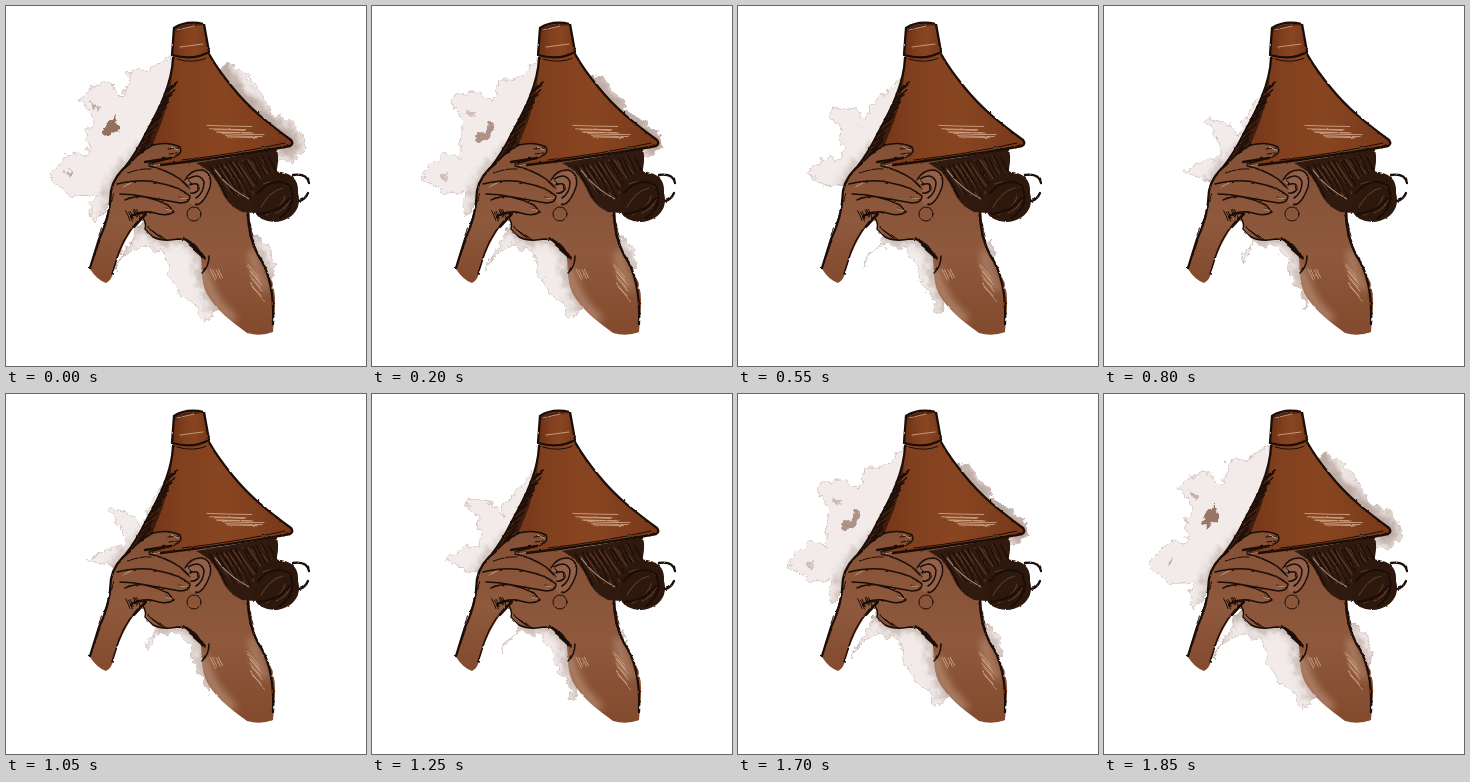
Recreate the animation shown at these times as an HTML page. Size 360 by 360 pixels, loop 1900 ms.

```html
<!DOCTYPE html>
<html lang="en">
<head>
<meta charset="utf-8">
<title>Woman with a clay hat</title>
<style>
  html, body { margin: 0; width: 100%; height: 100%; overflow: hidden; background: #fff; }
  svg { display: block; width: 100vw; height: 100vh; }
  .ink { fill: none; stroke: #1b0d07; stroke-width: 1.5; stroke-linecap: round; stroke-linejoin: round; }
  .bold { stroke-width: 2.3; }
  .fine { stroke-width: 1; }
  .chalk { fill: none; stroke: #cfa283; stroke-width: .9; stroke-linecap: round; }
  .lock { fill: none; stroke: #5b3823; stroke-width: 1.2; stroke-linecap: round; }
</style>
</head>
<body>
<svg viewBox="0 0 360 360">
  <defs>
    <linearGradient id="clay" x1="0" y1="0" x2="1" y2="0">
      <stop offset="0" stop-color="#6a3013"/>
      <stop offset=".35" stop-color="#81401e"/>
      <stop offset=".6" stop-color="#884521"/>
      <stop offset="1" stop-color="#78391a"/>
    </linearGradient>
    <linearGradient id="skin" x1="0" y1="0" x2="0" y2="1">
      <stop offset="0" stop-color="#845035"/>
      <stop offset=".55" stop-color="#8e593d"/>
      <stop offset="1" stop-color="#834a2d"/>
    </linearGradient>
    <filter id="ragged" x="-10%" y="-10%" width="120%" height="120%" color-interpolation-filters="sRGB">
      <feTurbulence type="fractalNoise" baseFrequency=".11" numOctaves="3" seed="8"/>
      <feDisplacementMap in="SourceGraphic" scale="13" xChannelSelector="R" yChannelSelector="G"/>
    </filter>
    <filter id="sketchy" x="-10%" y="-10%" width="120%" height="120%" color-interpolation-filters="sRGB">
      <feTurbulence type="fractalNoise" baseFrequency=".2" numOctaves="2" seed="3"/>
      <feDisplacementMap in="SourceGraphic" scale="2" xChannelSelector="R" yChannelSelector="G"/>
    </filter>
    <filter id="soft" x="-60%" y="-60%" width="220%" height="220%">
      <feGaussianBlur stdDeviation="4"/>
    </filter>
    <clipPath id="inStain"><path class="stain"/></clipPath>
    <clipPath id="inFace"><use href="#face"/></clipPath>

    <path id="cone" d="M167 49C166 82 148 112 138 131Q130 147 117 162L150 159Q230 150 284 140Q288 138 285 134C262 117 244 103 227 82Q212 64 203 47Z"/>
    <path id="knob" d="M168 22Q181 13 198 18L203 46Q187 55 166 49Z"/>
    <path id="face" d="M142 160L240 150 244 215C245 235 254 252 263 269Q270 282 269 300L267 326Q254 331 241 327C226 316 210 304 201 288C194 274 197 260 194 246Q186 233 172 233Q156 236 147 231Q144 226 140 223Q141 217 136 211Z"/>
    <path id="arm" d="M174 141Q162 135 147 139Q134 146 124 157Q109 169 105 184Q104 211 94 231Q86 249 84 263Q91 274 100 277Q106 274 107 266Q112 248 121 232Q129 218 139 208Q153 212 168 208Q170 203 163 199Q175 199 184 194Q187 184 177 176L145 158Q161 155 172 150Q177 146 174 141Z"/>
    <path id="hair" d="M190 157L271 143Q274 156 269 170Q267 190 249 207L236 206Q221 199 215 184Q208 168 197 161Z"/>
    <path id="bun" d="M256 172Q266 163 279 167Q293 171 292 187Q296 202 284 211Q270 220 256 213Q245 208 249 192Q248 180 256 172Z"/>
  </defs>

  <g filter="url(#ragged)">
    <path class="stain" fill="#f2ebea" stroke="#cbb9b2" stroke-width=".8"/>
    <g clip-path="url(#inStain)">
      <g filter="url(#soft)" fill="none" stroke="#6b4634" stroke-width="8" opacity=".4">
        <use href="#face"/><use href="#arm"/>
        <path d="M205 50Q230 95 285 134L280 150" stroke-width="18"/>
      </g>
      <g id="specks" fill="#94705f">
        <path d="M97 123L104 116 110 108 112 120 106 130 97 131Z"/>
        <path d="M84 98L94 101 89 105ZM59 165L65 162 63 172Z" opacity=".5"/>
      </g>
    </g>
  </g>

  <g filter="url(#sketchy)">
    <!-- face and neck -->
    <use href="#face" fill="url(#skin)"/>
    <g clip-path="url(#inFace)">
      <g filter="url(#soft)" fill="none" stroke="#d9b9a4" stroke-width="8" opacity=".6">
        <path d="M197 262Q201 292 228 315"/>
        <path d="M246 245Q250 268 260 284" stroke-width="6"/>
      </g>
    </g>
    <path class="ink" d="M136 211Q141 217 139 223L147 231Q157 236 172 233Q187 233 194 246M203 250Q203 261 196 267"/>
    <path class="ink bold" d="M242 207Q242 230 252 249Q269 273 267 318"/>
    <path class="ink" data-hatch="177 231 192 246 9 8 10"/>
    <path class="ink fine" data-hatch="142 222 152 229 8 6 5"/>
    <path class="ink fine" data-hatch="240 210 245 230 5 12 5"/>
    <path class="chalk" data-hatch="242 258 246 280 11 13 8"/>
    <path class="chalk" data-hatch="203 262 212 264 5 10 4"/>

    <!-- hair -->
    <use href="#hair" fill="#301a10"/>
    <path class="lock" data-hatch="209 161 255 152 21 30 11"/>
    <path class="ink" data-hatch="205 160 262 150 18 32 12"/>
    <path d="M209 164Q222 182 243 193" fill="none" stroke="#a98973" stroke-width="1.2"/>
    <use href="#bun" fill="#2d180e"/>
    <path class="lock" d="M257 178Q276 171 286 184Q286 200 270 207M255 201Q264 185 277 182M260 209Q277 201 279 190"/>
    <path class="ink bold" d="M252 187Q267 169 284 180Q292 199 274 212M253 208Q273 206 284 192M287 169Q301 167 303 177M302 187Q299 194 293 195"/>

    <!-- ear and earring -->
    <path d="M178 174Q188 164 203 165Q208 174 203 187Q196 200 189 201Q180 195 181 183Z" fill="#93614a"/>
    <path class="ink" d="M179 174Q185 163 196 164Q207 167 204 181Q198 198 190 199M182 173Q194 166 198 176Q198 187 190 192M184 179Q193 175 193 183Q190 188 184 187"/>
    <path class="ink fine" data-hatch="179 170 177 184 6 7 5"/>
    <circle class="ink fine" cx="188" cy="208" r="7"/>

    <!-- hat -->
    <use href="#cone" fill="url(#clay)"/>
    <path d="M166 70Q160 96 146 118Q138 139 122 159L143 157Q144 143 151 128Q163 101 166 70Z" fill="#2b140b" opacity=".75"/>
    <path class="ink" data-hatch="161 84 128 156 10 -8 20"/>
    <use href="#knob" fill="url(#clay)"/>
    <path d="M169 23Q183 16 197 19Q184 20 170 26Z" fill="#4b2111"/>
    <path class="ink bold" d="M168 22Q180 14 198 18L203 46Q187 55 166 49ZM167 52C166 82 148 112 138 131Q130 147 120 160M203 48Q212 64 227 82C244 103 262 117 285 134Q288 138 284 140Q230 150 155 159"/>
    <path class="ink fine" d="M176 154Q230 148 279 137M171 53Q187 58 201 52"/>
    <path class="chalk" data-hatch="202 120 222 132 40 1 8"/>
    <path class="chalk" d="M171 24L188 20M174 41L197 38"/>

    <!-- arm and hand -->
    <use href="#arm" fill="url(#skin)"/>
    <path class="ink" d="M126 155Q135 145 147 139Q162 135 174 141Q177 147 170 150Q156 155 143 158M139 208Q121 224 113 246L106 268M111 178Q137 172 153 177Q174 181 184 190Q184 197 174 197L146 192Q131 188 119 194M114 188Q140 188 162 199L168 206Q160 211 149 207Q139 204 126 209M143 160Q159 163 174 173L182 181"/>
    <path class="ink bold" d="M124 157Q108 169 105 185Q104 212 93 233L84 262M139 156L165 152M125 211Q133 205 140 208L128 221"/>
    <path class="ink fine" d="M162 143L173 142M163 148L172 147M173 191L183 194M160 202L167 206M122 167Q134 162 145 163"/>
    <path class="ink fine" data-hatch="119 205 131 204 4 9 6"/>
    <path class="ink fine" data-hatch="104 198 88 250 3 -9 9"/>
    <path class="chalk" d="M165 141L172 144M174 192L181 193M160 203L166 205M117 181L125 177"/>
  </g>
</svg>
<script>
  const LOOP = 1900, STEP = 50;

  // Each patch draws in towards its centre; its spokes hold out longest.
  const patches = [
    { cx: 148, cy: 158, pace: .58, swing: .15, spokes: 7, tip: 174,
      rim: [168,46, 152,61, 122,67, 118,91, 103,76, 78,84, 75,94, 88,112, 80,124, 83,152,
            65,147, 43,170, 64,190, 92,189, 83,200, 88,216, 130,180, 165,120] },
    { cx: 205, cy: 235, pace: .45, swing: .2, spokes: 4, tip: 92,
      rim: [104,268, 116,252, 135,238, 158,246, 164,270, 178,294, 192,301, 201,317,
            208,303, 245,310, 268,264, 264,240, 249,230, 215,215, 140,210] },
    { cx: 225, cy: 125, pace: 1, swing: .1, spokes: 7, tip: 0,
      rim: [212,60, 232,62, 244,72, 268,108, 284,116, 297,128, 300,143, 286,157, 240,150, 200,140] }
  ];

  let seed = 5;
  const random = () => (seed = seed * 16807 % 2147483647) / 2147483647;
  const jitter = size => (random() - .5) * size;

  // Loose parallel strokes spread along a line
  function hatch(x0, y0, x1, y1, dx, dy, count) {
    let d = '';
    for (let i = 0; i < count; i++) {
      const k = i / (count - 1), length = .75 + random() * .4;
      const x = x0 + (x1 - x0) * k + jitter(3), y = y0 + (y1 - y0) * k + jitter(3);
      d += `M${x} ${y}q${dx * length / 2 + jitter(2)} ${dy * length / 2 + jitter(2)} ${dx * length} ${dy * length}`;
    }
    return d;
  }

  function outline({ cx, cy, pace, swing, spokes, tip, rim }, amount) {
    const points = [];
    for (let i = 0; i < rim.length; i += 2) {
      const dx = rim[i] - cx, dy = rim[i + 1] - cy;
      const turn = Math.atan2(dy, dx) - tip * Math.PI / 180;
      const keep = Math.max(0, 1 - amount * (pace - swing * Math.cos(spokes * turn)));
      points.push(`${cx + dx * keep} ${cy + dy * keep}`);
    }
    return `M${points.join('L')}Z`;
  }

  const stains = document.querySelectorAll('.stain');
  const specks = document.getElementById('specks');
  const start = performance.now();

  function draw() {
    const time = (performance.now() - start) % LOOP;
    const phase = Math.floor(time / STEP) * STEP / LOOP;
    const amount = (1 - Math.abs(1 - 2 * phase)) ** 1.2;
    const d = patches.map(patch => outline(patch, amount)).join('');
    stains.forEach(path => path.setAttribute('d', d));
    specks.setAttribute('transform', `translate(${60 * amount} ${35 * amount})`);
    specks.setAttribute('opacity', Math.max(0, 1 - 1.8 * amount));
    requestAnimationFrame(draw);
  }

  document.querySelectorAll('[data-hatch]').forEach(path =>
    path.setAttribute('d', hatch(...path.dataset.hatch.split(' ').map(Number))));
  draw();
</script>
</body>
</html>
```
